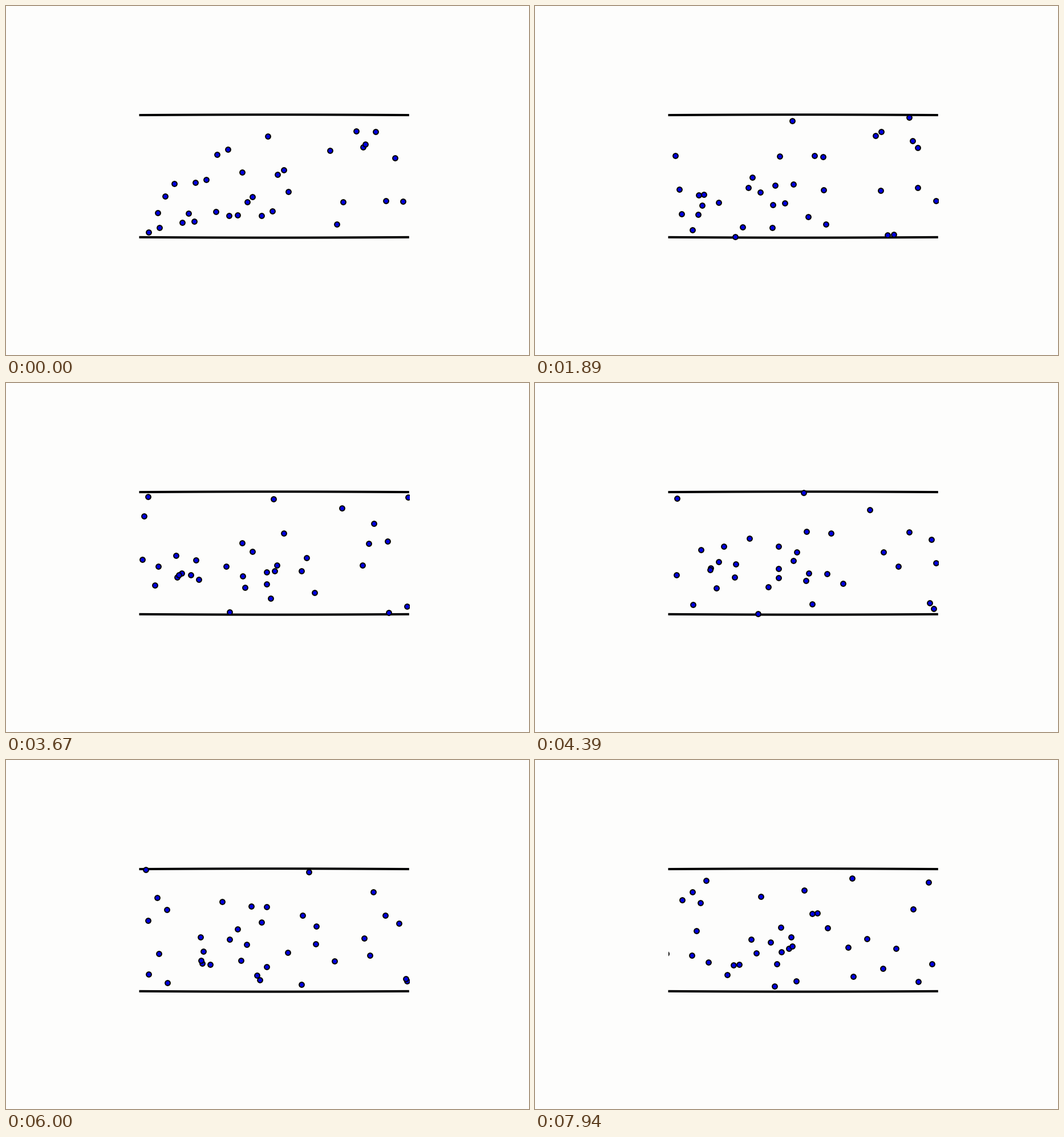
Write a matplotlib script that moves like this. It is 917 px wide and 611 px high and loops after 8000 ms.

```python
import numpy as np
import matplotlib.pyplot as plt
from matplotlib.animation import FuncAnimation
from matplotlib.patches import Rectangle

W, H, DPI = 917, 611, 100
PX = 72 / DPI
LEFT, RIGHT, TOP, BOTTOM = 233.5, 706.8, 190.5, 404.8
FRAMES = 144
STEP = 5.5    # spread of one random step, px
DRIFT = 0.6   # mean flow to the right, px per frame

rng = np.random.default_rng(12)


def cloud(n, x0, x1, y0, y1):
    """n dots spread evenly along x, at random heights."""
    slot = (x1 - x0) / n
    x = x0 + slot * (np.arange(n) + rng.random(n))
    return np.column_stack([x, rng.uniform(y0, y1, n)])


def bounce(y):
    """Reflect heights off the two walls."""
    span = BOTTOM - TOP
    y = np.mod(y - TOP, 2 * span)
    return TOP + np.where(y > span, 2 * span - y, y)


# The first cloud waits upstream and flows in as the right one flows out.
start = np.vstack([
    cloud(8, 110, 226, 200, 400),
    cloud(9, 245, 342, 285, 403),
    cloud(15, 350, 500, 215, 375),
    cloud(10, 560, 697, 205, 403),
])
steps = rng.normal((DRIFT, 0), STEP, (FRAMES,) + start.shape)
steps[0] = 0
paths = start + steps.cumsum(axis=0)
paths[..., 1] = bounce(paths[..., 1])

fig = plt.figure(figsize=(W / DPI, H / DPI), dpi=DPI, facecolor="#fdfdfc")
ax = fig.add_axes([0, 0, 1, 1])
ax.set(xlim=(0, W), ylim=(H, 0))
ax.axis("off")

# The walls bow outwards very slightly.
x = np.linspace(LEFT, RIGHT, 60)
bow = 0.8 * np.sin(np.pi * (x - LEFT) / (RIGHT - LEFT))
for wall in (TOP + 0.5 - bow, BOTTOM + bow):
    ax.plot(x, wall, color="black", lw=4 * PX, solid_capstyle="butt")

dots = ax.scatter([], [], s=(8.8 * PX) ** 2, facecolor="#0000e0",
                  edgecolor="black", linewidth=2 * PX, zorder=3)
dots.set_clip_path(Rectangle((LEFT, 0), RIGHT - LEFT, H,
                             transform=ax.transData))


def draw(i):
    dots.set_offsets(paths[i])
    return dots,


anim = FuncAnimation(fig, draw, frames=FRAMES, interval=8000 / FRAMES,
                     repeat=True, repeat_delay=0)
plt.show()
```
